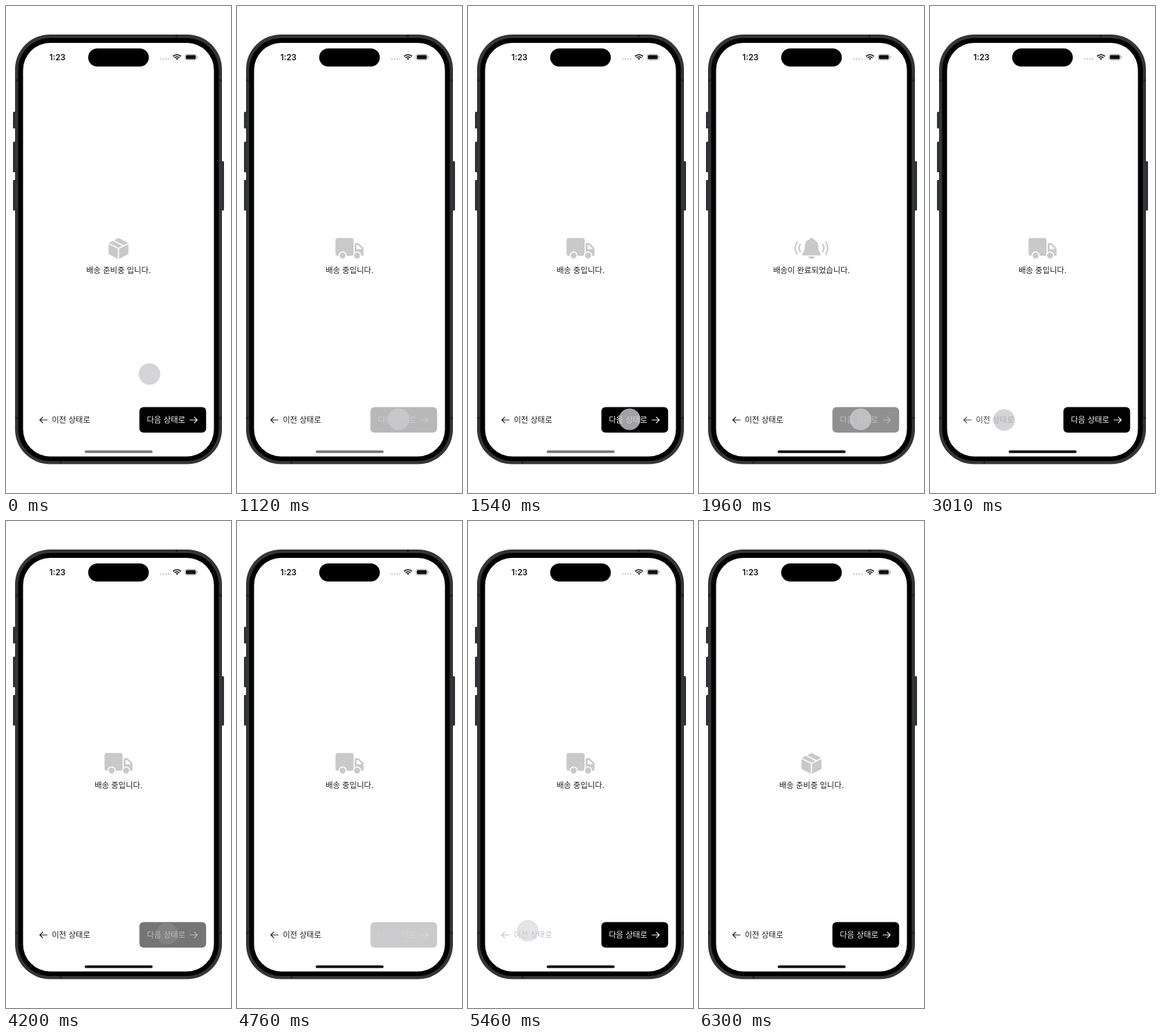
These frames come from a looping animation (323x700 px, 7280 ms). An HTML page:

```html
<!DOCTYPE html>
<html lang="ko">
<head>
<meta charset="utf-8">
<title>배송 상태</title>
<style>
  html, body { margin: 0; width: 100%; height: 100%; overflow: hidden; background: #fff; }
  svg { display: block; width: 100%; height: 100%; }
  text { font: 11.3px "Noto Sans CJK KR", "Noto Sans CJK", sans-serif; fill: #1c1c1c; }
  .state text { text-anchor: middle; }
  .clock { font: 600 11.6px Inter, sans-serif; fill: #111; }
  .icon { fill: #c9c9c9; }
  .round { stroke: #c9c9c9; stroke-width: 3; stroke-linejoin: round; }
  .cut { fill: none; stroke: #fff; stroke-width: 1.7; }
  .wave { fill: none; stroke: #c9c9c9; stroke-width: 2.1; stroke-linecap: round; }
  .arrow { fill: none; stroke-width: 1.15; stroke-linecap: round; stroke-linejoin: round; }
</style>
</head>
<body>
<svg viewBox="0 0 323 700">
  <defs>
    <path id="arrow" class="arrow" d="M-5.2 0H5.2M1 -4.2L5.2 0L1 4.2"/>
    <path id="waves" class="wave" d="M16.1 342.6q3.2 5.3 0 10.6M20.7 339.2q5.4 8.7 0 17.4"/>
  </defs>

  <!-- phone -->
  <g fill="#303132">
    <rect x="10" y="152" width="6" height="24" rx="1.5"/>
    <rect x="10" y="195" width="6" height="44" rx="1.5"/>
    <rect x="10" y="250" width="6" height="44" rx="1.5"/>
    <rect x="307" y="223" width="6" height="71" rx="1.5"/>
  </g>
  <rect x="13" y="41" width="297" height="617.5" rx="50" fill="#343536"/>
  <rect x="17.5" y="46" width="288" height="608" rx="46" fill="#000"/>
  <rect x="24.5" y="53" width="274" height="594.5" rx="39" fill="#fff"/>
  <path d="M13 107h4M306 107h4M13 592h4M306 592h4M245 41v4M78 654v4" stroke="#222" stroke-width="3"/>

  <!-- status bar -->
  <text class="clock" x="62.3" y="77.6">1:23</text>
  <rect x="118" y="61" width="87" height="26" rx="13"/>
  <path d="M222.4 76.2h11.2" stroke="#c4c4c4" stroke-width="2.2" stroke-linecap="round" stroke-dasharray="0 3.7"/>
  <g fill="none" stroke="#111" stroke-width="1.7">
    <path d="M239.8 72.3a8.2 8.2 0 0 1 11.4 0M241.9 74.5a5.2 5.2 0 0 1 7.2 0"/>
    <path d="M243.7 75.6a2.6 2.6 0 0 1 3.6 0L245.5 77.6Z" fill="#111" stroke="none"/>
  </g>
  <rect x="256.9" y="69.3" width="16.8" height="8.4" rx="2.6" fill="none" stroke="#aaa" stroke-width=".8"/>
  <rect x="258.2" y="70.6" width="14.2" height="5.8" rx="1.5" fill="#111"/>
  <path d="M274.9 72v3" stroke="#aaa"/>

  <!-- delivery states, in order -->
  <g transform="translate(161.5 0)">
    <g class="state">
      <path class="icon round" d="M0 335L12.8 341.5V355.7L0 362.2L-12.8 355.7V341.5Z"/>
      <path class="cut" d="M-14.5 341.2L0 348.4L14.5 341.2M0 348.4V364M-8.1 336.7L6.9 344.4"/>
      <text y="384.2">배송 준비중 입니다.</text>
    </g>
    <g class="state">
      <rect class="icon" x="-20.1" y="333.6" width="26" height="25.4" rx="3"/>
      <path class="icon round" d="M9 342.3H12.3L18.6 348.6V357.5H9Z"/>
      <path fill="#fff" d="M10.1 343.5H12.1L17.3 348.7V349.5H10.1Z"/>
      <g class="icon" stroke="#fff" stroke-width="1.6">
        <circle cx="-9.9" cy="358.6" r="5.1"/><circle cx="10.9" cy="358.6" r="5.1"/>
      </g>
      <text y="384.2">배송 중입니다.</text>
    </g>
    <g class="state">
      <circle class="icon" cy="336" r="2.8"/>
      <path class="icon" d="M-9.7 345C-9.7 332 9.7 332 9.7 345C9.7 351 10.9 353.2 12.8 355.2Q14.1 358.6 11.1 358.6H-11.1Q-14.1 358.6 -12.8 355.2C-10.9 353.2 -9.7 351 -9.7 345Z"/>
      <path class="icon" d="M-4.4 360H4.4Q3.6 363.4 0 363.4T-4.4 360Z"/>
      <use href="#waves"/><use href="#waves" transform="scale(-1 1)"/>
      <text y="384.2">배송이 완료되었습니다.</text>
    </g>
  </g>

  <!-- buttons -->
  <g id="prev">
    <use href="#arrow" transform="translate(53.8 595) scale(-1 1)" stroke="#1c1c1c"/>
    <text x="65.7" y="599">이전 상태로</text>
  </g>
  <g id="next">
    <rect x="191.5" y="576.5" width="95.8" height="36.8" rx="6"/>
    <g id="label">
      <use href="#arrow" transform="translate(269.3 595)" stroke="#f4f4f4"/>
      <text x="202.2" y="599" style="fill:#f4f4f4">다음 상태로</text>
    </g>
  </g>

  <rect id="home" x="113" y="638.8" width="97.5" height="3.8" rx="1.9"/>
  <circle id="touch" r="15.5" fill="#cbcbce"/>
</svg>
<script>
const LOOP = 7280, TICK = 70;
const HOLD = 100, DIM = 0.2, RECOVER = 250;
const MOVE = 560, LIFT = 145, LEAD = 380, TOUCH = 0.8;

// Release times: two taps on "next", two on "prev", and so on.
const taps = [1066, 1865, 2840, 3570, 4085, 4780, 5408, 5865]
  .map((up, i) => ({ up, down: up - HOLD, step: i % 4 < 2 ? 1 : -1 }));
const FIRST_LIFT = 4;   // from this tap on the finger leaves the glass

// Where the finger rests, and when it sets off for that place.
const spots = [
  { at: -MOVE, x: 206, y: 529 },
  { at: 240, x: 232, y: 594 },
  { at: 2000, x: 106.5, y: 595 },
  { at: 3570, x: 231.5, y: 593 },
  { at: 4780 + LIFT - MOVE / 2, x: 86, y: 589 }
];

const el = id => document.getElementById(id);
const views = document.querySelectorAll('.state');
const clamp = p => Math.min(1, Math.max(0, p));
const ease = p => p < .5 ? 2 * p * p : 1 - 2 * (1 - p) ** 2;

function buttonOpacity(step, t) {
  const tap = taps.filter(p => p.step === step && p.down <= t).pop();
  return tap ? DIM + (1 - DIM) * ease(clamp((t - tap.up) / RECOVER)) : 1;
}

function touchPoint(t) {
  return spots.reduce((from, to) => {
    const p = ease(clamp((t - to.at) / MOVE));
    return { x: from.x + (to.x - from.x) * p, y: from.y + (to.y - from.y) * p };
  }, spots[0]);
}

function touchOpacity(t) {
  const last = taps.findLastIndex(p => p.up <= t);
  if (last < FIRST_LIFT) return TOUCH;
  const gone = taps[last].up + LIFT, next = taps[last + 1];
  const out = 1 - clamp((t - taps[last].up) / LIFT);
  const back = next ? clamp((t - Math.max(gone, next.down - LEAD)) / LIFT) : 0;
  return TOUCH * Math.max(out, back);
}

function draw(t) {
  const done = taps.filter(p => p.up <= t);
  const current = done.reduce((sum, p) => sum + p.step, 0);
  views.forEach((view, i) => view.style.display = i === current ? '' : 'none');

  el('prev').style.opacity = buttonOpacity(-1, t);
  el('next').style.opacity = el('label').style.opacity = buttonOpacity(1, t);
  el('home').setAttribute('fill', done.length < 2 ? '#777' : '#000');

  const { x, y } = touchPoint(t);
  el('touch').setAttribute('transform', `translate(${x} ${y})`);
  el('touch').style.opacity = touchOpacity(t);
}

const start = performance.now();
function frame() {
  const t = (performance.now() - start) % LOOP;
  draw(Math.floor(t / TICK) * TICK);
  requestAnimationFrame(frame);
}
frame();
</script>
</body>
</html>
```
